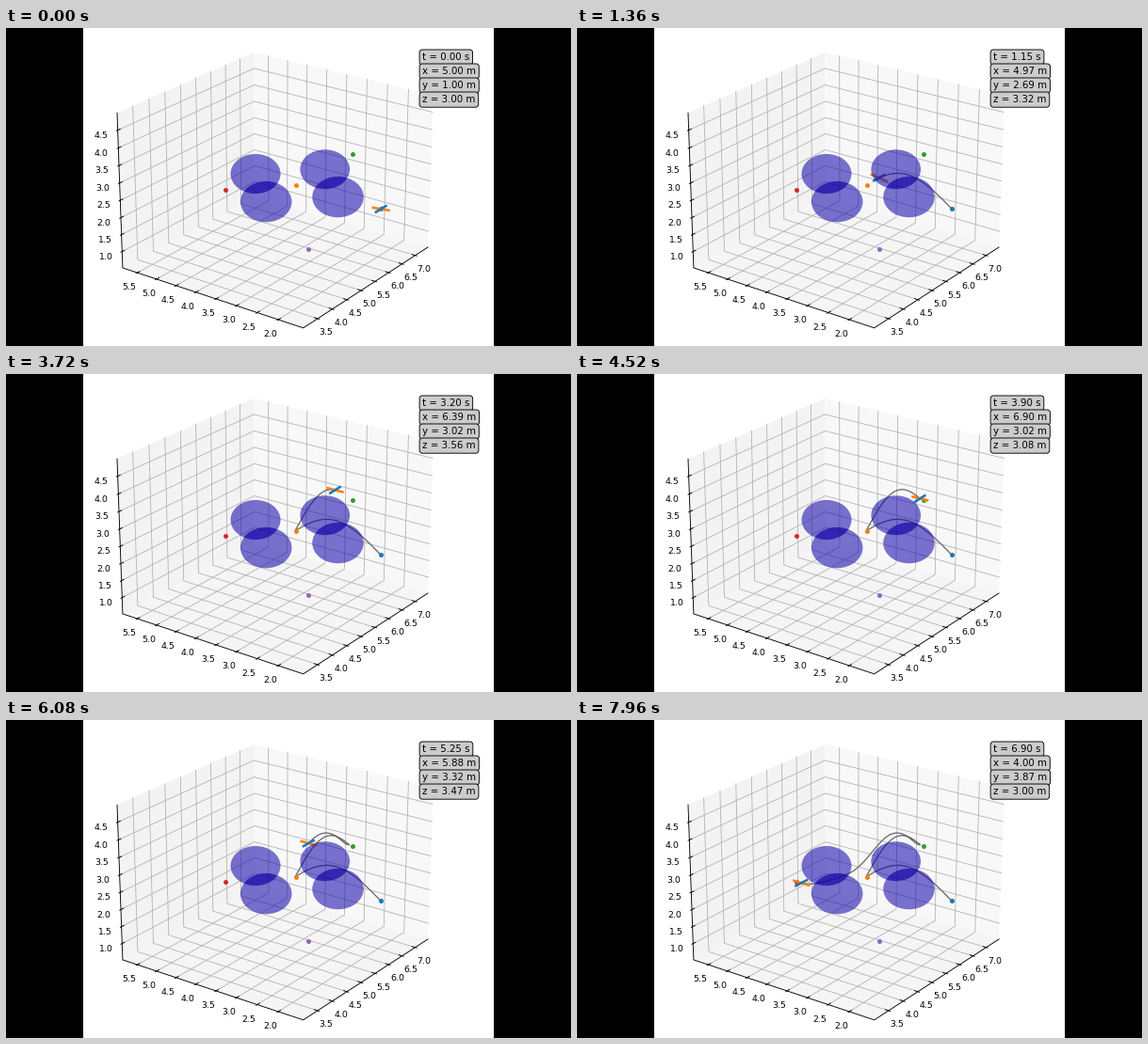
A matplotlib script that plays this animation: 600x338 px, repeating every 8 s.

```python
import numpy as np
import matplotlib.pyplot as plt
from matplotlib.animation import FuncAnimation
from matplotlib.patches import Ellipse, Polygon, Rectangle

W, H, DPI = 600, 338, 100
FRAMES, STEP = 200, 40
PX = 72 / DPI

# camera
AZ, EL = np.radians(36), np.radians(23)
MID = np.array([5.26, 3.65, 2.75])
UNIT = np.array([0.2665, 0.2665, 0.2])
HALF = np.array([0.5953, 0.5953, 0.4465])
LO, HI = MID - HALF / UNIT, MID + HALF / UNIT
SCALE, OX, OY, DIST = 1983, 287.9, 163.7, 10


def project(points):
    """World metres to stage pixels."""
    p = (np.asarray(points, float) - MID) * UNIT
    x, y, z = p[..., 0], p[..., 1], p[..., 2]
    depth = np.cos(AZ) * x + np.sin(AZ) * y
    right = np.sin(AZ) * x - np.cos(AZ) * y
    up = np.sin(EL) * depth + np.cos(EL) * z
    w = DIST + np.cos(EL) * depth - np.sin(EL) * z
    return np.stack([OX + SCALE * right / w, OY - SCALE * up / w], -1)


def ramp(t, start, span):
    return np.clip((t - start) / span, 0, 1)


def dash(t, start, span):
    """Quick departure, long settling."""
    return 1 - (1 - ramp(t, start, span)**2)**3.5


def smooth(t, start, span):
    u = ramp(t, start, span)
    return u * u * (3 - 2 * u)


def flight(t):
    """Three legs between waypoints, each with a hop over the obstacles."""
    a, b, c = dash(t, 0, 1.81), dash(t, 1.93, 2.29), dash(t, 4.352, 2.618)
    hop = np.sin(np.pi * a)
    x = 5 - 0.06 * hop + 1.92 * b - 2.92 * c
    y = 1 + 2.02 * a + 0.3 * smooth(t, 3.9, 1.3) + 0.65 * smooth(t, 5.4, 2)
    z = (3 + 0.65 * hop + 0.69 * np.sin(0.97 * np.pi * b) - 0.065 * c
         + 0.52 * np.sin(np.pi * ramp(t, 4.342, 1.427))**2)
    return np.stack([x, y, z], -1)


fig = plt.figure(figsize=(W / DPI, H / DPI), dpi=DPI, facecolor="black")
ax = fig.add_axes([0, 0, 1, 1])
ax.set_xlim(0, W)
ax.set_ylim(H, 0)
ax.axis("off")
ax.add_patch(Rectangle((82, -1), 436, H + 2, fc="white", ec="none", zorder=0))


def line(points, color, width, z, **kw):
    xy = project(points)
    return ax.plot(xy[:, 0], xy[:, 1], color=color, lw=width * PX, zorder=z, **kw)[0]


def pane(corners, color):
    ax.add_patch(Polygon(project(corners), fc=color, ec="none", zorder=1))


def tick(point, side, dx, dy, value):
    """Short mark across an edge along axis `side`, with its number."""
    ends = np.array([point, point], float)
    ends[:, side] += -0.037, 0.075
    line(ends, "black", 0.9, 3)
    x, y = project(point)
    ax.text(x + dx, y + dy, f"{value:.1f}", fontsize=9.4 * PX, ha="center",
            va="center", family="DejaVu Sans", zorder=3)


(x0, y0, z0), (x1, y1, z1) = LO, HI
pane([(x0, y0, z0), (x1, y0, z0), (x1, y1, z0), (x0, y1, z0)], "#f5f5f5")
pane([(x0, y1, z0), (x1, y1, z0), (x1, y1, z1), (x0, y1, z1)], "#f3f3f3")
pane([(x1, y0, z0), (x1, y1, z0), (x1, y1, z1), (x1, y0, z1)], "#f8f8f8")

GRID = dict(color="#b0b0b0", width=0.8, z=2)
for i in range(8):
    x, y, z = 3.5 + i / 2, 2 + i / 2, 1 + i / 2
    line([(x, y0, z0), (x, y1, z0), (x, y1, z1)], **GRID)
    line([(x0, y, z0), (x1, y, z0), (x1, y, z1)], **GRID)
    line([(x0, y1, z), (x1, y1, z), (x1, y0, z)], **GRID)
    tick((x, y0, z0), 1, 9, 15, x)
    tick((x0, y, z0), 0, -8.5, 15.7, y)
    tick((x0, y1, z), 0, -18, 5.6, z)
line([(x0, y1, z1), (x0, y1, z0), (x0, y0, z0), (x1, y0, z0)], "black", 0.9, 3)

# waypoints
SPOTS = [(5, 1, 3), (5, 3, 3), (7, 3, 3), (4, 4, 3), (4, 2, 2)]
for spot, color in zip(SPOTS, ("blue", "orange", "green", "red", "purple")):
    ax.plot(*project(spot), "o", color="tab:" + color, ms=5 * PX, mew=0, zorder=5)


def ball(x, y, size, color=(0.05, 0, 0.66), alpha=0.55, z=7):
    return ax.add_patch(Ellipse((x, y), size, size * 0.795, fc=color, ec="none",
                                alpha=alpha, zorder=z))


# obstacles, seen over the path and the craft
for back, front in [((265, 155, 53), (276.2, 184.6, 54.5)),
                    ((338.7, 150.2, 52.7), (352.5, 179.6, 54.5))]:
    shape = ball(*back)
    ball(*front)
    ball(*front, color=(0.1, 0, 0.59), alpha=0.25, z=3.5).set_clip_path(shape)

trail = line(SPOTS[:1], "#6a6a6a", 1.3, 4)
arm_y = line(SPOTS[:1], "tab:orange", 2.6, 6, solid_capstyle="butt")
arm_x = line(SPOTS[:1], "tab:blue", 2.6, 6, solid_capstyle="butt")
BOX = dict(boxstyle="round,pad=0.3", fc="#cccccc", ec="black", lw=0.9 * PX)
readout = [ax.text(442.2, 34.1 + 15 * i, "", fontsize=10.3 * PX, bbox=BOX,
                   family="DejaVu Sans", va="baseline", zorder=10 + i)
           for i in range(4)]

ARM, DT = 0.21, 0.1


def draw(n):
    t = 0.05 * np.floor(n * 0.694 + 0.15)
    before, pos, after = flight(np.array([t - DT, t, t + DT]))
    tilt = np.clip(0.6 * (before - 2 * pos + after) / DT**2 / 9.81, -0.3, 0.3)
    trail.set_data(*project(flight(np.linspace(0, t, int(t * 40) + 2))).T)
    for axis, arm in enumerate((arm_x, arm_y)):
        d = np.zeros(3)
        d[axis], d[2] = np.cos(tilt[axis]), -np.sin(tilt[axis])
        arm.set_data(*project([pos - ARM * d, pos + ARM * d]).T)
    readout[0].set_text(f"t = {t:.2f} s")
    for text, name, v in zip(readout[1:], "xyz", pos):
        text.set_text(f"{name} = {v:.2f} m")
    return [trail, arm_x, arm_y, *readout]


anim = FuncAnimation(fig, draw, frames=FRAMES, interval=STEP, repeat=True,
                     repeat_delay=0, blit=False)
plt.show()
```
